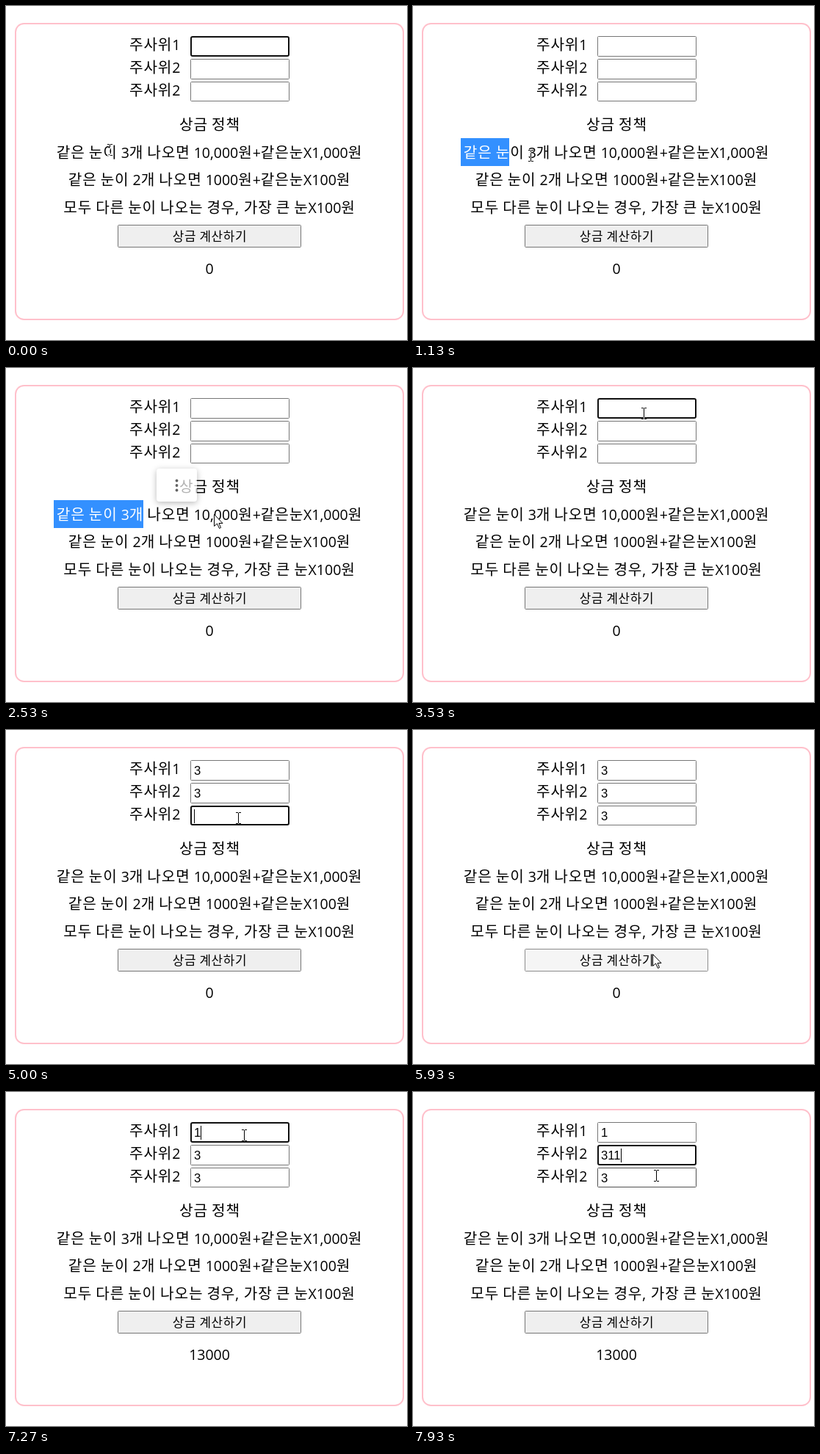
These frames come from a looping animation (546x455 px, 8 s). An HTML page with a canvas:

```html
<!DOCTYPE html>
<html lang="ko">
<head>
<meta charset="utf-8">
<title>주사위 상금</title>
<style>
  html, body { margin: 0; width: 100%; height: 100%; overflow: hidden; background: #fff; }
  canvas { display: block; }
</style>
</head>
<body>
<canvas id="stage" width="546" height="455"></canvas>
<script>
const ctx = document.getElementById('stage').getContext('2d');
const LOOP = 8000, RATE = 15;
const HANGUL = '"Noto Sans CJK KR DemiLight", "Noto Sans CJK KR", "Noto Sans CJK", sans-serif';
const LATIN = '"Open Sans", "Noto Sans", sans-serif';
const FIELD = { x: 251, w: 135, rows: [[41, 28], [72, 28], [103, 27]] };
const BUTTON = { x: 152, y: 298, w: 250, h: 31 };
const POLICY = '같은 눈이 3개 나오면 10,000원+같은눈X1,000원';
const BODY = 20, CONTROL = 16.67;

// All times below are in ticks of 1/15 s.
const focusSteps = [[0, 0], [13, -1], [45, 0], [67, 1], [75, 2], [84, -1], [105, 0], [112, 1]];
const valueSteps = [
  [[0, ''], [62, '3'], [108, ''], [109, '1']],
  [[0, ''], [71, '3'], [115, '31'], [116, '311']],
  [[0, ''], [78, '3']]
];
const prizeSteps = [[0, '0'], [91, '13000']];
const selectSteps = [[0, 0], [15, 85], [16, 111], [17, 131], [18, 150], [19, 167], [23, 187], [45, 0]];
const caretResets = [-13, 45, 62, 67, 71, 75, 78, 105, 108, 109, 112, 115, 116];
const menuAlpha = [[29, 0], [30, .15], [34, .2], [38, .7], [42, .15], [45, 0]];
const path = [
  [1, 141, 196, 'I'], [11, 73, 203, 'I'], [14, 72, 203, 'I'], [15, 98, 204, 'I'],
  [17, 160, 204, 'I'], [19, 178, 204, 'I'], [22, 178, 204, 'I'], [23, 183, 206, 'I'],
  [24, 190, 215, 'A'], [28, 240, 300, 'A'], [30, 250, 326, 'A'], [32, 250, 326, 'A'],
  [34, 254, 333, 'A'], [38, 283, 199, 'A'], [41, 308, 100, 'A'], [43, 314, 62, 'I'],
  [62, 314, 62, 'I'], [66, 315, 89, 'I'], [70, 315, 89, 'I'], [72, 316, 120, 'I'],
  [77, 316, 120, 'I'], [78, 318, 150, 'A'], [81, 328, 292, 'A'], [87, 328, 292, 'A'],
  [89, 326, 305, 'A'], [94, 326, 305, 'A'], [98, 327, 230, 'A'], [101, 328, 104, 'I'],
  [104, 324, 59, 'I'], [109, 324, 59, 'I'], [111, 326, 77, 'I'], [116, 326, 77, 'I'],
  [119, 331, 114, 'I']
];

const stepAt = (list, t) => list.filter(s => s[0] <= t).pop()[1];

function between(keys, t) {
  const i = keys.findIndex(k => k[0] > t);
  if (i === 0) return keys[0].slice(1);
  if (i < 0) return keys[keys.length - 1].slice(1);
  const a = keys[i - 1], b = keys[i], f = (t - a[0]) / (b[0] - a[0]);
  return a.slice(1).map((v, n) => typeof v === 'number' ? v + (b[n + 1] - v) * f : v);
}

// Hangul and Latin runs each have their own font.
function setRunFont(run, size) {
  const latin = run.charCodeAt(0) < 128;
  ctx.font = latin ? `${size * .975}px ${LATIN}` : `${size * 1.01}px ${HANGUL}`;
  ctx.letterSpacing = latin ? '0px' : `${size * .043}px`;
  ctx.wordSpacing = `${size * .08}px`;
}

function text(str, x, y, { size = BODY, align = 'center', color = '#000' } = {}) {
  const runs = str.match(/[\x20-\x7e]+|[^\x20-\x7e]+/g);
  const widths = runs.map(run => {
    setRunFont(run, size);
    return ctx.measureText(run).width;
  });
  if (align === 'center') x -= widths.reduce((a, b) => a + b) / 2;
  ctx.textAlign = 'left';
  ctx.fillStyle = color;
  runs.forEach((run, i) => {
    setRunFont(run, size);
    ctx.fillText(run, x, y);
    x += widths[i];
  });
  ctx.letterSpacing = ctx.wordSpacing = '0px';
}

function box(x, y, w, h, fill, stroke, line = 1) {
  ctx.beginPath();
  ctx.roundRect(x + line / 2, y + line / 2, w - line, h - line, line);
  ctx.fillStyle = fill;
  ctx.fill();
  ctx.lineWidth = line;
  ctx.strokeStyle = stroke;
  ctx.stroke();
}

function drawField(i, t, mouse) {
  const [y, h] = FIELD.rows[i], { x, w } = FIELD;
  const focused = stepAt(focusSteps, t) === i;
  const value = stepAt(valueSteps[i], t);
  const hover = inside(mouse, x, y, w, h);
  box(x, y, w, h, '#fff', focused ? '#101010' : hover ? '#4f4f4f' : '#767676', focused ? 2 : 1);
  ctx.font = `${CONTROL}px "Liberation Sans", Arial, sans-serif`;
  ctx.textAlign = 'left';
  ctx.fillStyle = '#000';
  ctx.fillText(value, x + 5, y + 20);
  const since = t - caretResets.filter(r => r <= t).pop();
  if (focused && since % 17 < 8) {
    ctx.fillRect(x + 5 + Math.round(ctx.measureText(value).width), y + 5, 1, 19);
  }
}

function inside([px, py], x, y, w, h) {
  return px >= x && px < x + w && py >= y && py < y + h;
}

function drawButton(t, mouse) {
  const { x, y, w, h } = BUTTON;
  const pressed = t === 89 || t === 90;
  const hover = inside(mouse, x, y, w, h);
  const [fill, edge] = pressed ? ['#f5f5f5', '#8d8d8d'] : hover ? ['#e5e5e5', '#4f4f4f'] : ['#efefef', '#767676'];
  box(x, y, w, h, fill, edge);
  text('상금 계산하기', 277.5, 320, { size: CONTROL });
}

function drawSelection(end) {
  if (!end) return;
  ctx.save();
  ctx.beginPath();
  ctx.rect(65, 180, end - 65, 38);
  ctx.clip();
  ctx.fillStyle = '#3390ff';
  ctx.fillRect(65, 180, end - 65, 38);
  text(POLICY, 277, 207, { color: '#fff' });
  ctx.restore();
}

function drawMenu(alpha) {
  if (!alpha) return;
  const shape = new Path2D(), outside = new Path2D();
  shape.roundRect(205, 137, 55, 45, 4);
  outside.rect(0, 0, 546, 455);
  outside.addPath(shape);
  ctx.save();
  ctx.globalAlpha = alpha;
  ctx.fillStyle = '#fff';
  ctx.fill(shape);
  ctx.fillStyle = '#222';
  for (const y of [153.5, 160, 166.5]) {
    ctx.beginPath();
    ctx.arc(232.5, y, 1.9, 0, 7);
    ctx.fill();
  }
  ctx.clip(outside, 'evenodd');
  ctx.shadowColor = 'rgba(0,0,0,.4)';
  ctx.shadowBlur = 9;
  ctx.shadowOffsetY = 2;
  ctx.fillStyle = '#fff';
  ctx.fill(shape);
  ctx.restore();
}

function drawCursor([x, y, kind]) {
  ctx.save();
  ctx.translate(Math.round(x), Math.round(y));
  if (kind === 'I') {
    // The text cursor inverts what lies under it.
    ctx.globalCompositeOperation = 'difference';
    ctx.fillStyle = '#fff';
    ctx.fillRect(0, -7, 1, 14);
    for (const dy of [-8, 7]) {
      ctx.fillRect(-3, dy, 3, 1);
      ctx.fillRect(1, dy, 3, 1);
    }
  } else {
    ctx.translate(.5, .5);
    ctx.beginPath();
    [[0, 0], [0, 16], [4, 12.5], [7, 19], [9, 18], [6.5, 12], [11.5, 12]].forEach(p => ctx.lineTo(...p));
    ctx.closePath();
    ctx.fillStyle = '#fff';
    ctx.fill();
    ctx.lineWidth = 1;
    ctx.strokeStyle = '#000';
    ctx.stroke();
  }
  ctx.restore();
}

function draw(t) {
  const mouse = between(path, t);
  ctx.fillStyle = '#fff';
  ctx.fillRect(0, 0, 546, 455);
  ctx.beginPath();
  ctx.roundRect(13, 24, 528, 403, 11.5);
  ctx.lineWidth = 2;
  ctx.strokeStyle = 'pink';
  ctx.stroke();

  ['주사위1', '주사위2', '주사위2'].forEach((label, i) => {
    text(label, 168, 60 + 31 * i, { align: 'left' });
    drawField(i, t, mouse);
  });
  text('상금 정책', 277.5, 169);
  text(POLICY, 277, 207);
  text('같은 눈이 2개 나오면 1000원+같은눈X100원', 277, 244);
  text('모두 다른 눈이 나오는 경우, 가장 큰 눈X100원', 277, 282);
  drawButton(t, mouse);
  text(stepAt(prizeSteps, t), 277, 365);

  drawSelection(stepAt(selectSteps, t));
  drawMenu(between(menuAlpha, t)[0]);
  drawCursor(mouse);
}

const start = performance.now();
function frame() {
  const ms = (performance.now() - start) % LOOP;
  draw(Math.floor((ms + 5) * RATE / 1000));
  requestAnimationFrame(frame);
}
frame();
</script>
</body>
</html>
```
